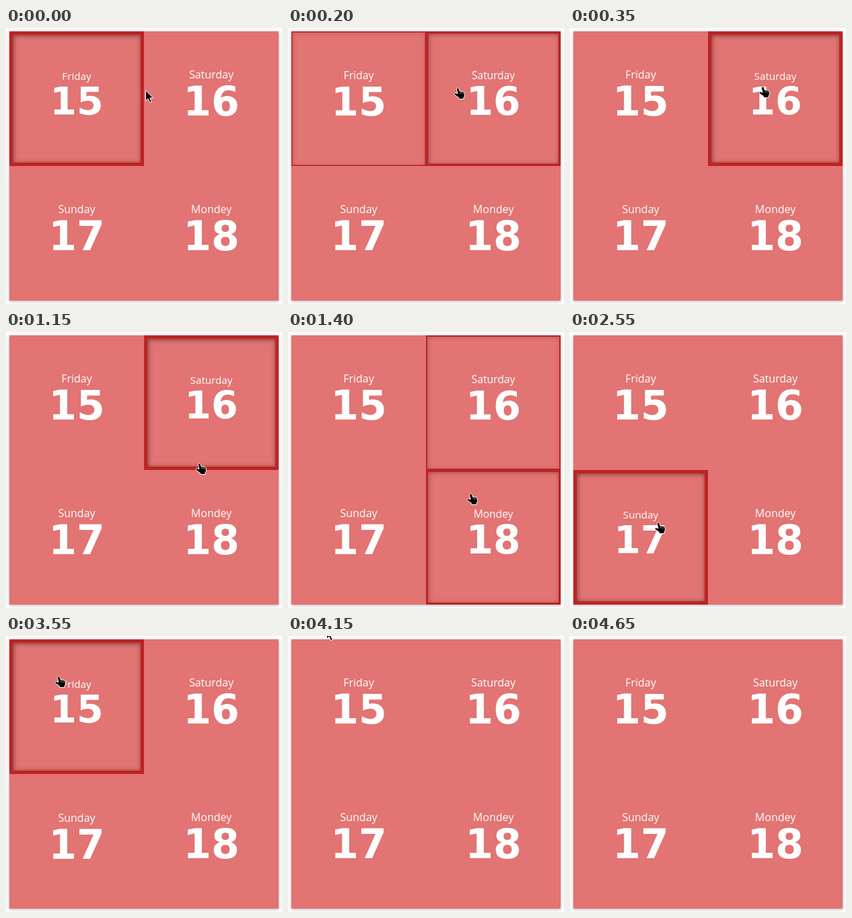
Animation of 410 by 410 pixels, one loop 5.1 s. Source, as an HTML page:

```html
<!DOCTYPE html>
<html lang="en">
<head>
<meta charset="utf-8">
<title>Day picker</title>
<style>
/* --p: 0 = flat, 1 = pressed in. A registered property keeps scaled text sharp. */
@property --p { syntax: "<number>"; inherits: true; initial-value: 0; }

html, body {
  margin: 0;
  width: 100%;
  height: 100%;
  overflow: hidden;
  background: #fff;
}
.stage {
  position: relative;
  width: 410px;
  height: 410px;
  overflow: hidden;
}
.grid {
  position: absolute;
  left: 5px;
  top: 5px;
  display: grid;
  grid-template: 200px 200px / 200px 200px;
  background: #e27473;
  box-shadow: 0 1px 5px rgba(0, 0, 0, .3);
}
.cell { background: #bc2423; }
.face {
  position: relative;
  width: 200px;
  height: 200px;
  background: #e27473;
  color: #fff;
  text-align: center;
  transform: scale(calc(1 - .05 * var(--p)));
  box-shadow: inset 1px 1px 8px rgba(0, 0, 0, calc(.5 * var(--p)));
}
.day, .num { position: absolute; left: 0; width: 200px; }
.day { top: 53px; font: 16px/22px "Open Sans", sans-serif; }
.num { top: 69px; font: bold 60px/70px "DejaVu Sans", sans-serif; }

.cell, .cursor, .arrow, .hand, #sun .day, #sun .num {
  animation: 5100ms step-end infinite;
}
#fri { animation-name: fri; }
#sat { animation-name: sat; }
#sun { animation-name: sun; }
#mon { animation-name: mon; }
#sun .day, #sun .num { animation-name: settle; }

.cursor { position: absolute; left: 0; top: 0; animation-name: move; }
.cursor svg { position: absolute; left: 0; top: 0; overflow: visible; }
.arrow { animation-name: arrow; }
.hand { animation-name: hand; }

/* Percentages are ms / 51; motion advances in 50 ms ticks. */
@keyframes fri {
  0% { --p: 1; animation-timing-function: steps(6); }
  5.8823% { --p: 0; }
  69.6078% { --p: 1; }
  81.3725%, 100% { --p: 0; }
}
@keyframes sat {
  0% { --p: 0; animation-timing-function: steps(6); }
  5.8823% { --p: 1; }
  24.5098% { --p: 1; animation-timing-function: steps(4); }
  28.4313% { --p: .2; }
  40.196%, 100% { --p: 0; }
}
@keyframes mon {
  0% { --p: 0; }
  24.5098% { --p: 0; animation-timing-function: steps(4); }
  28.4313% { --p: .8; }
  40.196% { --p: 1; }
  45.098% { --p: .4; }
  50%, 100% { --p: 0; }
}
@keyframes sun {
  0% { --p: 0; }
  45.098% { --p: .4; }
  50% { --p: 1; }
  69.6078%, 100% { --p: 0; }
}
@keyframes settle {
  0% { margin-top: 0; }
  69.6078% { margin-top: 1px; }
  75.4901%, 100% { margin-top: 0; }
}
@keyframes move {
  0% { transform: translate(207px, 92px); }
  .9803% { transform: translate(212px, 90px); animation-timing-function: steps(6); }
  6.8627% { transform: translate(280px, 86px); }
  14.7058% { transform: translate(280px, 86px); animation-timing-function: steps(8); }
  22.549% { transform: translate(281px, 194px); animation-timing-function: steps(6); }
  28.4313% { transform: translate(262px, 248px); }
  40.196% { transform: translate(220px, 279px); }
  45.098% { transform: translate(172px, 288px); }
  50% { transform: translate(125px, 282px); }
  62.745% { transform: translate(106px, 212px); }
  69.6078% { transform: translate(72px, 59px); }
  75.4901% { transform: translate(60px, 0); }
  81.3725% { transform: translate(57px, -12px); }
  83.3333% { transform: translate(57px, -12px); animation-timing-function: steps(4); }
  91.1764%, 100% { transform: translate(57px, -22px); }
}
@keyframes arrow {
  0% { visibility: visible; }
  .9803% { visibility: hidden; }
  81.3725%, 100% { visibility: visible; }
}
@keyframes hand {
  0% { visibility: hidden; }
  .9803% { visibility: visible; }
  81.3725%, 100% { visibility: hidden; }
}
</style>
</head>
<body>
<div class="stage">
  <div class="grid">
    <div class="cell" id="fri"><div class="face"><div class="day">Friday</div><div class="num">15</div></div></div>
    <div class="cell" id="sat"><div class="face"><div class="day">Saturday</div><div class="num">16</div></div></div>
    <div class="cell" id="sun"><div class="face"><div class="day">Sunday</div><div class="num">17</div></div></div>
    <div class="cell" id="mon"><div class="face"><div class="day">Mondey</div><div class="num">18</div></div></div>
  </div>
  <div class="cursor">
    <svg class="arrow" width="12" height="20">
      <path d="M.5.8V16.2L4 12.9 6.6 18.8 9.2 17.7 6.7 11.9H11.5Z" fill="#000" stroke="#fff"/>
    </svg>
    <svg class="hand" width="17" height="19">
      <path d="M4.6 1.9C5.4.8 7.3.8 7.9 2.2L9.2 5.9 13.6 6.4Q16.2 6.9 16.4 9V13L15 15V17.5H7.3V15.3L1.8 11.6C.4 10.4 1.2 8.4 3 8.7L6 9.6 4.4 3.6Z" fill="#000" stroke="#fff"/>
      <path d="M9.8 7.5V9.5M12 7.8V9.8M14.1 8.2V10" stroke="#fff" stroke-width=".6"/>
    </svg>
  </div>
</div>
</body>
</html>
```
